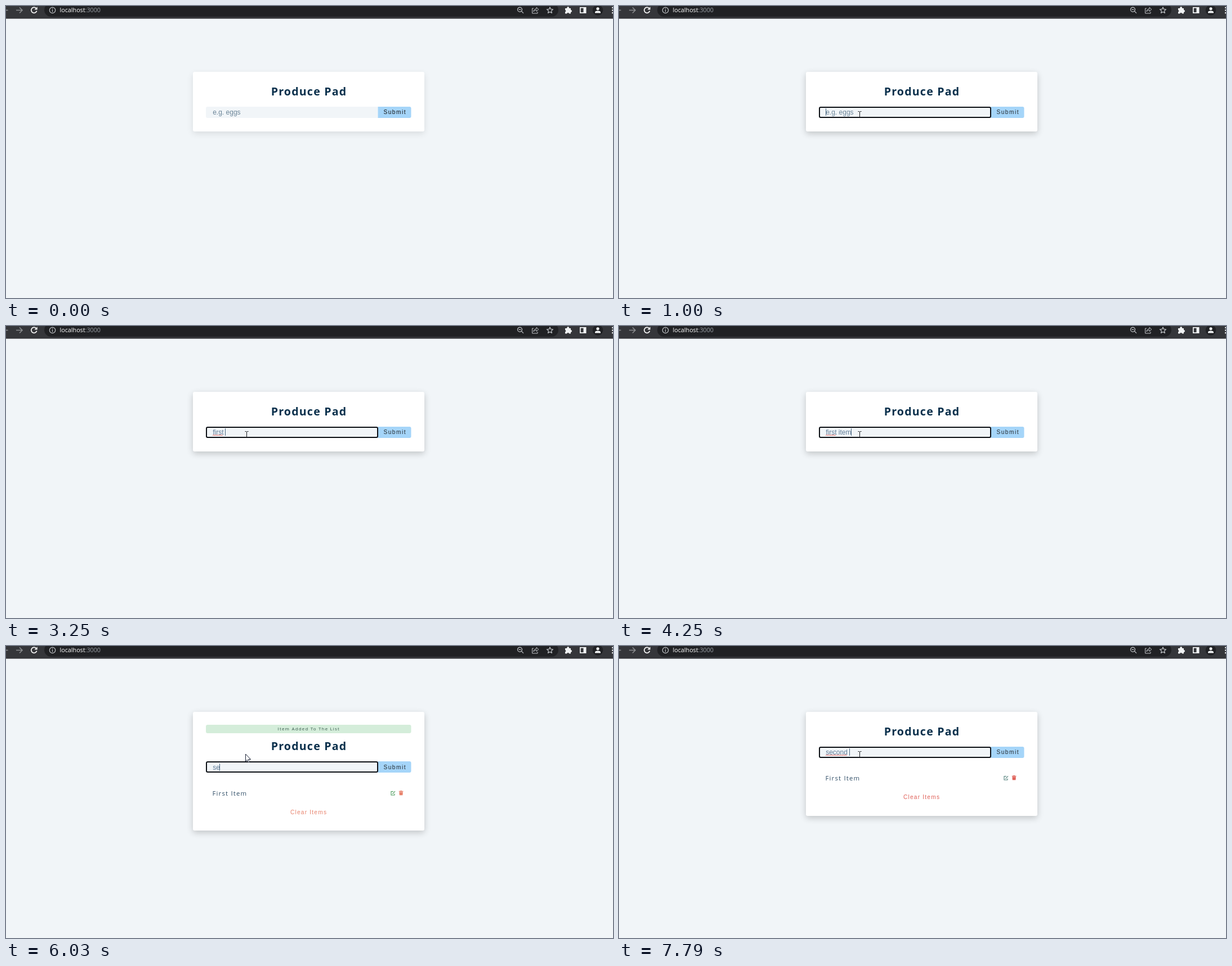
Recreate the animation shown at these times as an HTML page. Size 1078x519 px, loop 8000 ms.

```html
<!DOCTYPE html>
<html lang="en">
<head>
<meta charset="utf-8">
<title>Shopping list</title>
<style>
  html, body { margin: 0; width: 100%; height: 100%; overflow: hidden; background: #f1f5f8; }
  #card { position: absolute; left: 331.5px; top: 117px; width: 411.5px; border-radius: 3px; background: #fff; }
  svg { position: absolute; left: 0; top: 0; }
  text { white-space: pre; font-variant-ligatures: none; }
  .ui { font-family: "Open Sans", "Noto Sans", sans-serif; }
  .form { font-family: "Liberation Sans", Arial, sans-serif; }
  .mid { text-anchor: middle; }
  .line { fill: none; stroke-width: 1.2; }
</style>
</head>
<body>
<div id="card"></div>
<svg width="1078" height="519" viewBox="0 0 1078 519">
  <!-- browser bar -->
  <rect width="1078" height="22.6" fill="#35363a"/>
  <rect x="68" y="-5" width="913" height="24" rx="12" fill="#202124"/>
  <g class="line" stroke="#8b8d90" style="stroke-width:1.5">
    <path d="M-4 7.5H3.5M18 7.5H29M24 2.5L29 7.5L24 12.5"/>
  </g>
  <path class="line" d="M53.6 4A5 5 0 1 0 54.6 8.8" stroke="#fff" style="stroke-width:1.7"/>
  <path d="M55.6 1.5V6.6H50.5Z" fill="#fff"/>
  <g class="line" stroke="#c3c6ca">
    <circle cx="82.5" cy="7.5" r="5.2"/>
    <path d="M82.5 6.6V10.5M82.5 4.2V5.4"/>
    <circle cx="912.5" cy="6.3" r="4"/>
    <path d="M915.4 9.2L919 12.8M910.5 6.3H914.5"/>
    <path d="M937 4.2H934.6V13H944V10.5M936.8 10C937.2 6.5 939.5 5 942 5V2.4L945.8 6L942 9.6V7.3C939.8 7.3 938 8 936.8 10Z" style="stroke-width:1"/>
    <path id="star" stroke-linejoin="round"/>
  </g>
  <text class="ui" x="95.5" y="11.3" font-size="10.75" fill="#fff">localhost<tspan fill="#9aa0a6">:3000</tspan></text>
  <g fill="#f1f3f4">
    <path d="M993 4H996.3A2 2 0 1 1 1000 4H1003V7A2 2 0 1 1 1003 11V13.5H1000A2 2 0 0 0 996.2 13.5H993V10.6A2 2 0 0 0 993 6.9Z"/>
    <path fill-rule="evenodd" d="M1019 2H1030.5V13H1019ZM1020.7 3.7V11.3H1025.5V3.7Z"/>
    <circle cx="1051" cy="7.5" r="9.3" fill="#202124"/>
    <circle cx="1051" cy="4.8" r="2.6"/>
    <path d="M1046 12.4V11C1046 7.7 1056 7.7 1056 11V12.4Z"/>
    <circle cx="1077.3" cy="3" r="1.3"/><circle cx="1077.3" cy="7.6" r="1.3"/><circle cx="1077.3" cy="12.2" r="1.3"/>
  </g>

  <g id="alert">
    <rect x="355" y="140" width="364.5" height="15" rx="3" fill="#d4edda"/>
    <text class="ui mid" x="537.8" y="150.3" font-size="7.93" letter-spacing="1.2" fill="#35584a">Item Added To The List</text>
  </g>

  <g id="boxes">
    <text class="ui mid" x="538" y="159" font-size="19.6" font-weight="700" letter-spacing="1.2" fill="#0a304c">Produce Pad</text>
    <path d="M660.5 179H358A3 3 0 0 0 355 182V196A3 3 0 0 0 358 199H660.5Z" fill="#f1f5f8"/>
    <path d="M660.5 179H716.5A3 3 0 0 1 719.5 182V196A3 3 0 0 1 716.5 199H660.5Z" fill="#a5d5f9"/>
    <rect id="focus" x="356" y="180" width="304" height="18" rx="2.2" fill="none" stroke="#0c0f14" stroke-width="2"/>
  </g>

  <g id="labels">
    <text id="submit" class="form" x="670.4" y="192.2" font-size="10.2" letter-spacing="1.5">Submit</text>
    <text id="entry" class="form" x="367.2" y="193" font-size="12"></text>
    <path id="squiggle" class="line" stroke="#e0483e" style="stroke-width:.9"/>
    <rect id="caret" y="182" width="1" height="13" fill="#4a6780"/>
    <g id="list">
      <text class="ui" x="366.4" y="238.5" font-size="11.4" letter-spacing="1.2" fill="#2f4d66">First Item</text>
      <path id="edit" class="line" d="M688 231.5H684V238H690V235.5M686.5 235.8L691 231.2" style="stroke-width:1.1"/>
      <g id="danger">
        <path d="M697.8 230.8H700L700.5 230H702.7L703.2 230.8H705.4V232H697.8ZM698.3 232.5H704.9L704.4 238.3H698.8Z"/>
        <text class="form mid" x="537.6" y="272.3" font-size="10.2" letter-spacing="1.2">Clear Items</text>
      </g>
    </g>
  </g>

  <circle id="click" cx="426" cy="192.6" r="9.6" fill="#fbee23" opacity=".65"/>
  <path id="beam" class="line" d="M424.5 187.5H426.5L427.5 188.3L428.5 187.5H430.5M427.5 188V198M424.5 198.5H426.5L427.5 197.7L428.5 198.5H430.5" stroke="#15181c" style="stroke-width:1"/>
  <path id="arrow" d="M.5 .5V13.6L3.4 10.8L5.3 15.3L7.4 14.4L5.5 10H9.5Z" fill="#fff" stroke="#1b2336"/>
</svg>
<script>
const LOOP = 8000, TEXT_X = 367;
const ADDED = 4760, ALERT_END = 7790, FOCUS = 1000;

// [start ms, typed text, caret visible]
const typing = [
  [0, "", 0], [FOCUS, "", 1], [1490, "", 0],
  [2010, "fi", 1], [2230, "fir", 1], [2740, "first", 1], [3250, "first ", 1],
  [3760, "first i", 1], [4010, "first ite", 1], [4250, "first item", 1],
  [ADDED, "", 1], [5020, "", 0], [5520, "", 1],
  [6030, "se", 1], [6540, "sec", 1], [6790, "seco", 1], [7040, "secon", 1],
  [7540, "secon", 0], [ALERT_END, "second ", 1]
];

const $ = id => document.getElementById(id);
const set = (id, name, value) => $(id).setAttribute(name, value);
const show = (id, on) => set(id, "visibility", on ? "visible" : "hidden");
const moveY = (id, y) => set(id, "transform", `translate(0 ${y})`);

const star = Array.from({ length: 10 }, (_, i) => {
  const r = i % 2 ? 2.6 : 5.8, a = i * Math.PI / 5;
  return `${966 + r * Math.sin(a)} ${7.8 - r * Math.cos(a)}`;
});
set("star", "d", `M${star.join("L")}Z`);

function measure(text) {
  $("entry").textContent = text;
  return text ? $("entry").getComputedTextLength() : 0;
}

function squiggle(width) {
  let d = `M${TEXT_X} 194.7`;
  for (let x = 1.5, up = true; x <= width; x += 1.5, up = !up) d += `L${TEXT_X + x} ${up ? 193.5 : 194.7}`;
  return d;
}

function drawEntry(t) {
  const [, text, caretOn] = typing.findLast(step => step[0] <= t);
  const space = text.indexOf(" ");
  show("squiggle", space > 0);
  if (space > 0) set("squiggle", "d", squiggle(measure(text.slice(0, space))));
  set("caret", "x", Math.floor(TEXT_X + measure(text) + 0.1));
  show("caret", caretOn);
  $("entry").textContent = text || "e.g. eggs";
  set("entry", "fill", text ? "#617d98" : "#6b8598");
}

function draw(t) {
  const alerting = t >= ADDED && t < ALERT_END;
  const listed = t >= ADDED;
  const focused = t >= FOCUS;

  $("card").style.height = (listed ? 185 : 105.7) + (alerting ? 26 : 0) + "px";
  $("card").style.boxShadow = `0 3.75px ${t < 480 ? 11.25 : 12}px rgba(0,0,0,${t < 480 ? 0.1 : 0.2})`;
  moveY("boxes", alerting ? 26 : 0);
  moveY("labels", alerting ? 27 : 0);
  show("alert", alerting);
  show("list", listed);
  show("focus", focused);
  set("submit", "fill", focused ? "#22292e" : "#111");
  set("edit", "stroke", alerting ? "#4b9b5c" : "#4f7f78");
  set("danger", "fill", alerting ? "#e8836d" : "#e0625a");
  drawEntry(t);

  const entering = t >= 250 && t < 480;
  show("arrow", entering || alerting);
  set("arrow", "transform", `translate(425 ${entering ? 219 : 191.5})`);
  show("beam", t >= 480 && !alerting);
  moveY("beam", focused ? 0 : 1);
  show("click", t >= 740 && t < FOCUS);
}

const start = performance.now();
function tick() {
  draw((performance.now() - start) % LOOP);
  requestAnimationFrame(tick);
}
tick();
</script>
</body>
</html>
```
